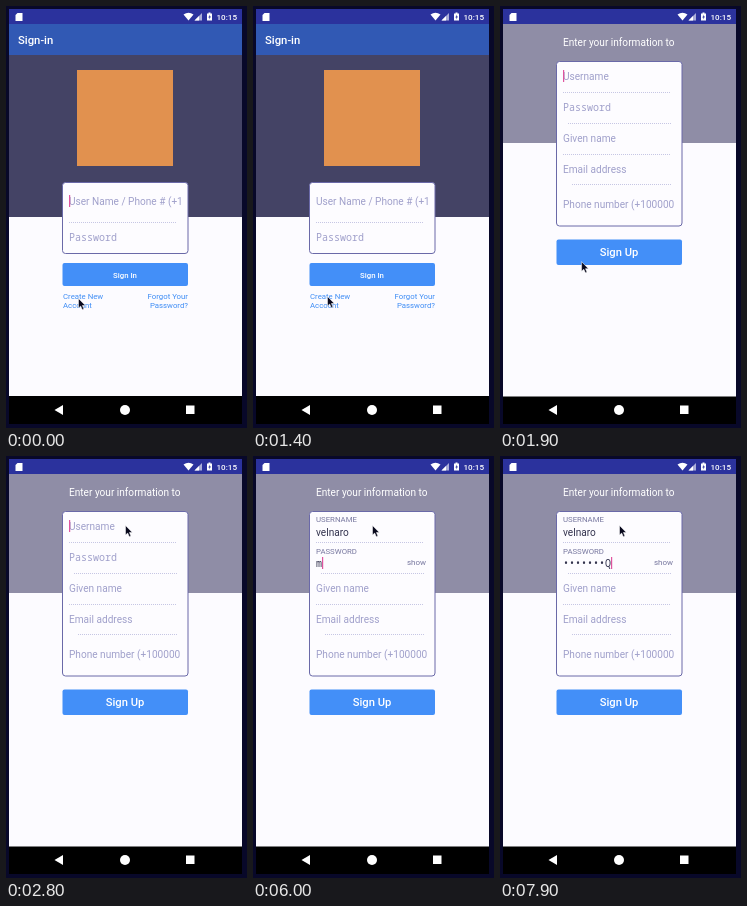
Animation, 241 px wide and 422 px high, one loop 8 s. Source, as an HTML page:

```html
<!DOCTYPE html>
<html lang="en">
<head>
<meta charset="utf-8">
<title>Sign-up flow</title>
<style>
  html, body { margin: 0; width: 100%; height: 100%; overflow: hidden; background: #080829; }
  svg { display: block; width: 100vw; height: 100vh; }
  text { font-family: Roboto, sans-serif; font-size: 10.1px; white-space: pre; }
  .hint { fill: #a0a0cb; }
  .mono { font-family: "Noto Sans Mono", monospace; font-size: 10px; }
  .label { fill: #77779f; font-size: 7.8px; }
  .value { fill: #34344f; }
  .link { fill: #3f8df5; font-size: 7.8px; }
  .white { fill: #fff; }
  .bold { font-weight: 500; }
  .line { stroke: #b9b9de; stroke-width: .8; stroke-dasharray: 1 1; }
  .card { fill: #fdfcff; stroke: #6a69a8; stroke-width: 1; }
  .button { fill: #438ff8; }
</style>
</head>
<body>
<svg viewBox="0 0 241 422" preserveAspectRatio="none">
  <defs>
    <clipPath id="field"><rect x="60" y="50" width="115.5" height="180"/></clipPath>
  </defs>
  <rect width="241" height="422" fill="#080829"/>
  <rect x="3" y="390" width="233" height="28"/>

  <g id="signIn">
    <rect x="3" y="18" width="233" height="372" fill="#fcfbff"/>
    <rect x="3" y="18" width="233" height="31" fill="#3159b4"/>
    <text class="white bold" x="12" y="37.5" style="font-size:11.3px">Sign-in</text>
    <rect x="3" y="49" width="233" height="162" fill="#444365"/>
    <rect x="71" y="64" width="96" height="96" fill="#e1914f"/>
    <rect class="card" x="56.5" y="176.5" width="125.5" height="71" rx="3"/>
    <text class="hint" x="63" y="199" clip-path="url(#signField)">User Name / Phone # (+1</text>
    <path class="line" d="M63 216.5H171"/>
    <text class="hint mono" x="63" y="234.5">Password</text>
    <rect class="button" x="56.5" y="257" width="125.5" height="23" rx="2"/>
    <text class="white bold" x="119" y="271.5" text-anchor="middle" style="font-size:7.8px">Sign In</text>
    <text class="link" x="57" y="292.5">Create New</text>
    <text class="link" x="57" y="302">Account</text>
    <text class="link" x="182" y="292.5" text-anchor="end">Forgot Your</text>
    <text class="link" x="182" y="302" text-anchor="end">Password?</text>
  </g>
  <clipPath id="signField"><rect x="60" y="185" width="115.5" height="22"/></clipPath>

  <g id="signUp">
    <rect x="3" y="14" width="233" height="376.5" fill="#fcfbff"/>
    <rect x="3" y="14" width="233" height="123" fill="#8f8da6"/>
    <text class="white" x="63" y="39.5">Enter your information to</text>
    <rect class="card" x="56.5" y="55.5" width="125.5" height="164.5" rx="3"/>
    <path class="line" d="M63 86.5H171M68 117.5H171M63 148.5H171M72 178.5H171"/>
    <text id="userHint" class="hint" x="63" y="73.8">Username</text>
    <text id="userLabel" class="label" x="63" y="66.3">USERNAME</text>
    <text id="userValue" class="value" x="63" y="80"></text>
    <text id="passHint" class="hint mono" x="63" y="104.8">Password</text>
    <g id="passLabel">
      <text class="label" x="63" y="97.5">PASSWORD</text>
      <text class="label" x="173" y="109" text-anchor="end" style="font-size:8px">show</text>
    </g>
    <text id="passValue" class="value mono" x="63" y="110.5"></text>
    <text class="hint" x="63" y="135.8">Given name</text>
    <text class="hint" x="63" y="166.8">Email address</text>
    <text class="hint" x="63" y="202.3" clip-path="url(#field)">Phone number (+100000</text>
    <rect class="button" x="56.5" y="233.5" width="125.5" height="25.5" rx="2"/>
    <text class="white bold" x="119" y="250.3" text-anchor="middle" style="font-size:11.2px">Sign Up</text>
  </g>

  <rect id="caret" width="1.2" height="12" fill="#e0559f"/>

  <rect x="3" y="3" width="233" height="15" fill="#2b329d"/>
  <g fill="#fff">
    <path d="M11.5 7H16.5V15H9.5V9Z"/>
    <path d="M177.5 8.5Q182.5 5 187.5 8.5L182.5 14.5Z"/>
    <path d="M188.5 14.5L196 7V14.5Z" opacity=".6"/>
    <path d="M188.5 14.5L193 10V14.5Z"/>
    <path d="M201 7.5H202.5V6.5H204.5V7.5H206V14.5H201Z"/>
    <path d="M57 399V409L48.5 404Z"/>
    <circle cx="119" cy="404" r="5"/>
    <rect x="180" y="399.5" width="8.5" height="8.5"/>
  </g>
  <path d="M204 8.5L202.3 11.5H203.5L203 13.5L205 10.5H203.7Z" fill="#2b329d"/>
  <text class="white bold" x="210.5" y="14" style="font-size:8.1px">10:15</text>

  <path id="pointer" d="M0 0V9.5L2.2 7.6L3.8 11.2L5.4 10.5L3.9 7H6.8Z" fill="#08081c" stroke="#fff" stroke-width=".5"/>
</svg>
<script>
  const LOOP = 8000, OPEN = 1500, PASS_FOCUS = 4900;
  const USER = { text: 'velnaro', keys: [3100, 3300, 3600, 3800, 4000, 4200, 4400] };
  const PASS = { text: 'mkT4vexQ', keys: [5900, 6200, 6400, 6700, 7000, 7200, 7500, 7800] };
  const el = id => document.getElementById(id);
  const show = (id, on) => el(id).setAttribute('visibility', on ? 'visible' : 'hidden');
  const move = (id, x, y) => el(id).setAttribute('transform', `translate(${x} ${y})`);
  const typed = (field, t) => field.keys.filter(k => k <= t).length;
  const ease = p => { p = Math.min(1, Math.max(0, p)); return p * p * (3 - 2 * p); };
  const mix = (a, b, p) => a + (b - a) * p;

  function drawCaret(t, slide, users, passes) {
    const inPass = t >= PASS_FOCUS;
    const resets = [-100, OPEN, PASS_FOCUS, ...USER.keys, ...PASS.keys];
    const last = Math.max(...resets.filter(k => k <= t));
    show('caret', (t - last) % 1000 < 500);
    if (t < OPEN) return move('caret', 63, 189);
    const count = inPass ? passes : users;
    const width = count ? el(inPass ? 'passValue' : 'userValue').getComputedTextLength() : 0;
    const top = (inPass ? 95 : 64) + (count ? 6 : 0);
    move('caret', 63 + width, top + slide);
  }

  function draw(t) {
    const opened = t >= OPEN;
    const slide = opened && t < OPEN + 100 ? 4 : 0;
    const users = typed(USER, t), passes = typed(PASS, t);
    show('signIn', !opened);
    el('signUp').style.display = opened ? '' : 'none';
    move('signUp', 0, slide);

    show('userHint', opened && !users);
    show('userLabel', opened && users);
    el('userValue').textContent = USER.text.slice(0, users);
    show('passHint', opened && !passes);
    show('passLabel', opened && passes);
    el('passValue').textContent = passes ? '•'.repeat(passes - 1) + PASS.text[passes - 1] : '';
    drawCaret(t, slide, users, passes);

    const nudge = ease((t - 200) / 600), travel = ease((t - 1700) / 800);
    move('pointer', mix(mix(72.5, 74.5, nudge), 119.5, travel), mix(mix(292.5, 290.5, nudge), 69.5, travel));
  }

  const start = performance.now();
  function tick() {
    draw((performance.now() - start) % LOOP);
    requestAnimationFrame(tick);
  }
  tick();
</script>
</body>
</html>
```
